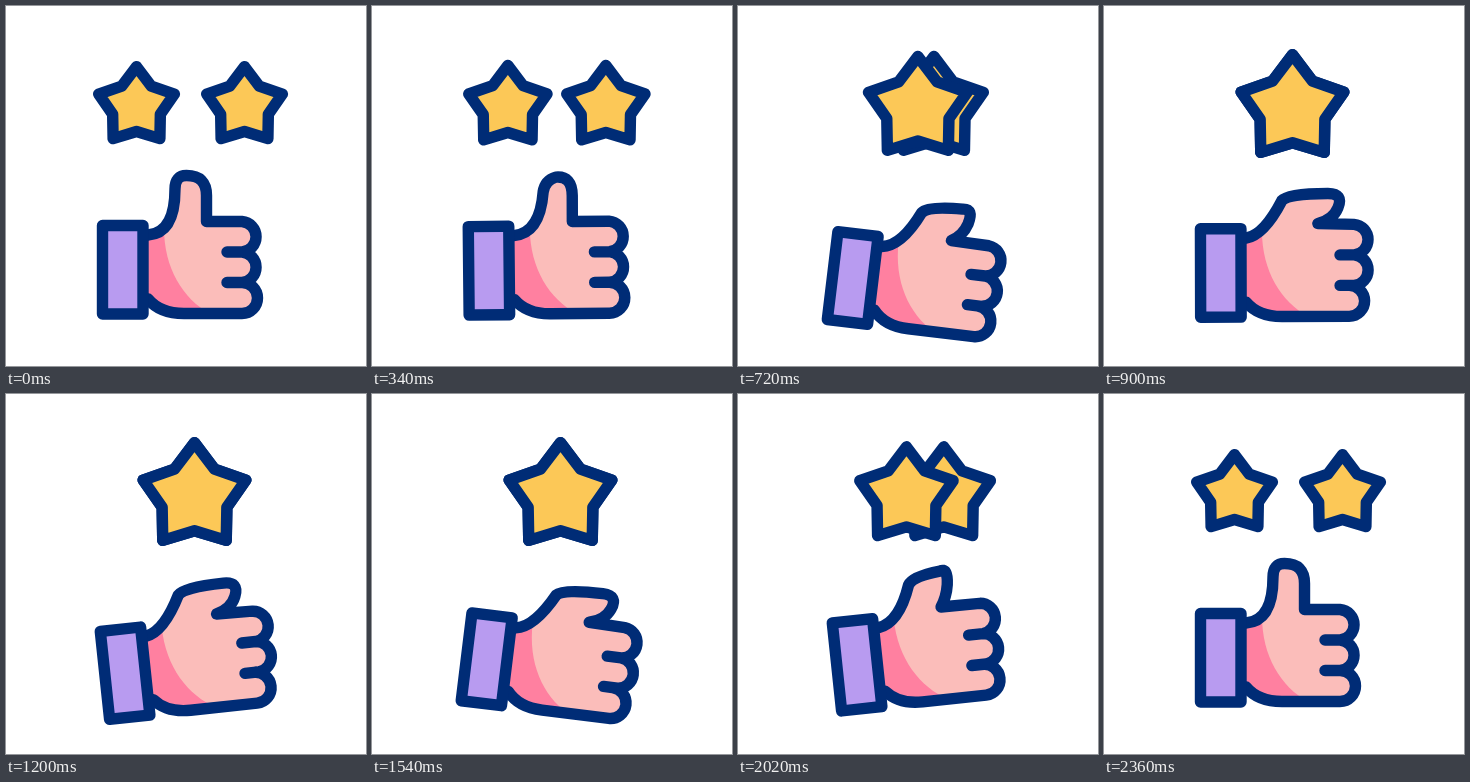
An HTML page for the animation above (2400 ms loop, 360 by 360 pixels).

```html
<!DOCTYPE html>
<html lang="en">
<head>
<meta charset="utf-8">
<title>Thumbs up rating</title>
<style>
  html, body { margin: 0; width: 100%; height: 100%; overflow: hidden; background: #fff; }
  svg { display: block; width: 100%; height: 100%; }
  .line { stroke: #002c76; stroke-width: 11.4; stroke-linejoin: round; stroke-linecap: round; }
</style>
</head>
<body>
<svg viewBox="0 0 360 360">
  <path id="right" class="line" fill="#fcc857"/>
  <path id="left" class="line" fill="#fcc857"/>
  <g id="hand">
    <path id="skin" fill="#fbbdba"/>
    <path fill="#ff80a0" d="M140 229Q151 228 158 222C158 262 177 293 204 307.5H178Q154 307.5 140 292Z"/>
    <path id="outline" class="line" fill="none"/>
    <rect class="line" fill="#b89bf0" x="96.5" y="219.5" width="40.5" height="88.5"/>
  </g>
</svg>
<script>
const LOOP = 2400;
const $ = id => document.getElementById(id);
const mix = (a, b, u) => a + (b - a) * u;
const clamp = u => Math.min(1, Math.max(0, u));
// Eased progress from 0 to 1 between two times
const ramp = (t, from, to) => (1 - Math.cos(Math.PI * clamp((t - from) / (to - from)))) / 2;

// Thumb control points: x, y upright, x, y folded, and how late the point folds
const THUMB = [
  [169, 227, 160, 226, 1], [169, 183, 178, 191.5, 0.5],
  [169, 169.5, 184, 184.5, 0.5], [180.5, 169.5, 224, 184.5, 1],
  [200.5, 169.5, 240, 184.5, 2], [200.5, 189.5, 234, 199, 2],
  [200.5, 202, 229, 211, 2], [200.5, 215.5, 214, 214.5, 2]
];

function star(x, y, r) {
  const pts = [];
  for (let i = 0; i < 10; i++) {
    const a = i * Math.PI / 5, d = i % 2 ? r * 0.63 : r;
    pts.push(x + d * Math.sin(a), y - d * Math.cos(a));
  }
  return `M${pts}Z`;
}

function handPath(fold) {
  const thumb = THUMB.map(([x0, y0, x1, y1, lag]) => {
    const u = fold ** lag;
    return [mix(x0, x1, u), mix(y0, y1, u)];
  });
  const x = 236 + 14 * fold, low = 236 + 9 * fold, gap = 221 + 15 * fold;
  const tip = (cx, y) => `A15.3 15.3 0 0 1 ${cx} ${y}`;
  return `M142 229Q${thumb}L${x} 215.5${tip(x, 246)}H${gap}H${x}${tip(x, 276.5)}` +
    `H${gap}H${low}${tip(low, 307.5)}H178Q154 307.5 142 293`;
}

function draw(t) {
  const fold = clamp(ramp(t, 205, 895) - ramp(t, 1795, 2360));

  const mid = mix(184.5, 188.5, fold), gap = 54 * (1 - fold);
  const y = mix(100.4, 102.7, fold), r = mix(39.8, 54, fold);
  $('right').setAttribute('d', star(mid + gap, y, r));
  $('left').setAttribute('d', star(mid - gap, y, r));

  const d = handPath(fold);
  $('skin').setAttribute('d', d);
  $('outline').setAttribute('d', d);

  // The fist rocks steadily; the dip at each end of a swing fades out
  const swing = Math.cos(Math.PI * (t - 645) / 485) * ramp(t, 205, 645) * (1 - ramp(t, 2100, 2360));
  const tilt = 7.3 * swing + 0.5 * fold;
  const drop = 3 * fold + swing * swing * (2050 - t) / 90;
  $('hand').setAttribute('transform', `translate(0 ${drop}) rotate(${tilt} 164 244)`);
}

const start = performance.now();
function tick() {
  draw((performance.now() - start) % LOOP);
  requestAnimationFrame(tick);
}
tick();
</script>
</body>
</html>
```
